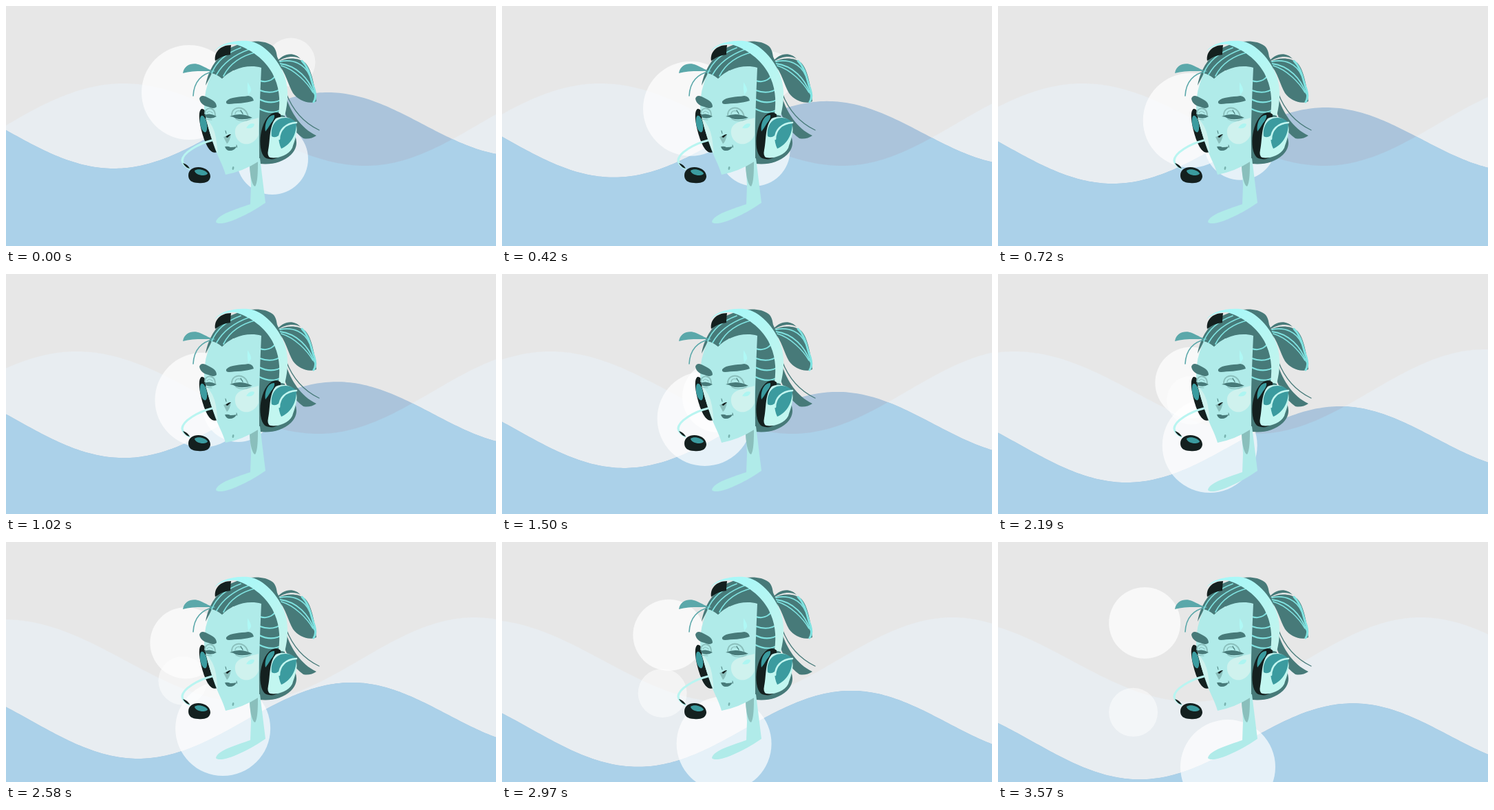
Write an HTML page with a canvas that moves like this. It is 712 px wide and 350 px high and loops after 3.6 s.

```html
<!DOCTYPE html>
<html lang="en">
<head>
<meta charset="utf-8">
<title>Headset</title>
<style>
html, body { margin: 0; width: 100%; height: 100%; overflow: hidden; background: #e7e7e7; }
canvas { display: block; }
</style>
</head>
<body>
<canvas id="stage" width="712" height="350"></canvas>
<script>
const W = 712, H = 350, LOOP = 3600, STEP = 30;
const ctx = document.getElementById('stage').getContext('2d');

const SKIN = '#b0ebe9', SHADE = '#8abfbc', HAIR = '#477a79', STRAND = '#80e3e1';
const BLACK = '#14201f', TEAL = '#3b9b9f', BOOM = '#b9f5f1', CUP = '#c2f6f0', GLOW = '#cff2ee';

const BAND = ctx.createLinearGradient(335, 52, 405, 150);
BAND.addColorStop(0, '#a8f8f8');
BAND.addColorStop(1, '#c4f4ed');

// Turning points of each wave at t = 0; speeds are px per ms.
const paleWave = { points: [[-215, 262], [171, 113], [523, 233], [854, 110], [1184, 232]], vx: -0.0672, vy: 0 };
const blueWave = { points: [[-155, 126], [157, 237], [467, 126], [745, 219]], vx: 0.0137, vy: 0.0306 };

const circles = [
  { x: 414, y: 82, r: 35.5, vx: -0.0609, vy: 0.0466, alpha: 0.5 },
  { x: 387, y: 223, r: 52, vx: -0.0487, vy: -0.0294, alpha: 0.7 },
  { x: 266, y: 126, r: 69, vx: 0.01905, vy: 0.0566, alpha: 0.7 }
];

function waveHeight(points, x) {
  let i = 0;
  while (i < points.length - 2 && x > points[i + 1][0]) i++;
  const [x0, y0] = points[i], [x1, y1] = points[i + 1];
  return y0 + (y1 - y0) * (1 - Math.cos(Math.PI * (x - x0) / (x1 - x0))) / 2;
}

function wavePath({ points, vx, vy }, t) {
  const path = new Path2D();
  path.moveTo(-4, H + 4);
  for (let x = -4; x <= W + 4; x += 4) {
    path.lineTo(x, waveHeight(points, x - vx * t) + vy * t);
  }
  path.lineTo(W + 4, H + 4);
  path.closePath();
  return path;
}

function drawBackground(t) {
  ctx.fillStyle = '#e7e7e7';
  ctx.fillRect(0, 0, W, H);
  const pale = wavePath(paleWave, t), blue = wavePath(blueWave, t);
  ctx.fillStyle = '#e8edf1';
  ctx.fill(pale);
  ctx.fillStyle = '#abc4db';
  ctx.fill(blue);
  ctx.save();
  ctx.clip(pale);
  ctx.fillStyle = '#abd1e9';
  ctx.fill(blue);
  ctx.restore();
  for (const c of circles) {
    ctx.fillStyle = `rgba(255,255,255,${c.alpha})`;
    ctx.beginPath();
    ctx.arc(c.x + c.vx * t, c.y + c.vy * t, c.r, 0, 2 * Math.PI);
    ctx.fill();
  }
}

const shape = (color, d) => ({ color, path: new Path2D(d) });
const line = (color, width, d) => ({ color, width, path: new Path2D(d) });
function oval(color, x, y, rx, ry, degrees = 0) {
  const path = new Path2D();
  path.ellipse(x, y, rx, ry, degrees * Math.PI / 180, 0, 2 * Math.PI);
  return { color, path };
}

const ponytail = [
  shape(HAIR, 'M394 82C406 75 424 74 435 83C444 92 449 118 451 139C440 144 425 138 417 127C410 115 407 98 394 82Z'),
  shape(HAIR, 'M393 82C402 69 418 66 428 77C419 72 407 73 393 82Z'),
  line(STRAND, 1.8, 'M398 81C418 77 434 85 441 101'),
  line(STRAND, 2, 'M398 84C423 87 440 106 448 128'),
  line(STRAND, 1.6, 'M400 87C420 93 438 112 446 126'),
  line(STRAND, 3, 'M430 80C442 92 443 109 448 121C450 128 451 134 447 140'),
  shape(HAIR, 'M407 133C414 155 428 178 451 189Q442 195 432 193C419 184 409 168 404 152Z'),
  line(HAIR, 1.3, 'M407 127C415 148 430 169 455 181')
];

const hair = [
  shape(HAIR, 'M290 116C294 92 308 71 328 60C348 50 374 48 387 58C392 62 393 68 394 74C403 92 408 126 403 157L421 192Q425 206 414 217C402 228 386 232 368 230L366 95L330 94L314 107L299 99Z'),
  shape('#5ba8aa', 'M257 98C259 85 272 82 282 86C291 90 297 94 303 95C286 95 270 94 257 98Z'),
  line('#5ba8aa', 1.6, 'M272 131C273 112 282 99 303 95'),
  line(STRAND, 1.7, 'M299 98C305 83 319 69 341 61'),
  line(STRAND, 1.7, 'M306 100C315 84 329 72 354 63'),
  line(STRAND, 1.7, 'M316 102C324 86 339 73 365 67'),
  line(STRAND, 2, 'M369 109C382 113 391 106 396 94'),
  line(STRAND, 2, 'M369 123C382 128 393 126 402 119'),
  line(STRAND, 2, 'M368 136C382 143 394 141 404 134'),
  line(STRAND, 2, 'M368 150C380 156 390 157 400 151')
];

const head = [
  shape(BLACK, 'M284 150C290 149 292 158 295 170L307 213C300 216 294 210 289 197C283 181 277 155 284 150Z'),
  oval(TEAL, 287, 172, 4.8, 12.5, -11),
  shape(SKIN, 'M354 224L356 262L355 289C335 296 307 304 305 315C308 320 326 315 336 310Q357 301 377 287L369 222Z'),
  shape(SHADE, 'M354 231C354 247 358 263 362 263C366 257 366 239 366 224Z'),
  shape(SKIN, 'M299 98Q307 100 314 106C326 93 350 84 371 90C369 136 367 181 368 226Q345 241 319 246C315 231 307 219 302 203Q293 178 288 150Q287 124 299 98Z'),
  shape(GLOW, 'M290 163Q302 174 305 192L308 215Q300 201 290 163Z'),
  shape(GLOW, 'M333 181C335 169 349 168 367 163L367 188C363 199 350 205 341 199C335 195 332 188 333 181Z'),
  shape('#adf5f1', 'M349 178Q354 169 361 172Q360 180 349 178Z'),
  shape('#aff8f5', 'M351 111Q357 120 356 124L352 130Q350 120 351 111Z')
];

const features = [
  shape(HAIR, 'M320 139C326 132 340 133 352 131Q359 132 360 138C350 142 333 142 324 143Q319 143 320 139Z'),
  shape(HAIR, 'M281 135Q283 129 290 132C298 136 306 139 306 147Q302 151 294 147C286 145 282 141 281 135Z'),
  line(SHADE, 1.9, 'M328 159C328 151 335 147 342 149C348 151 351 156 352 162'),
  line(SHADE, 1.4, 'M333 157C334 152 341 151 344 157'),
  line(HAIR, 1.1, 'M341 152L344 157'),
  shape(HAIR, 'M325 161Q341 154 358 163Q344 167 334 164Q330 161 325 161Z'),
  line(SHADE, 1.2, 'M334 165Q344 170 355 165'),
  line(SHADE, 1.9, 'M289 157C289 151 294 148 299 150Q304 152 304 160'),
  line(SHADE, 1.2, 'M292 156Q295 151 300 156'),
  shape(HAIR, 'M288 159Q297 155 306 161Q300 165 292 163Z'),
  line(SHADE, 1.1, 'M290 165L299 166'),
  line(HAIR, 1, 'M319 182L320 186'),
  shape(SHADE, 'M316 191L327 187Q325 198 321 201Z'),
  shape(BLACK, 'M319 191Q323 187 327 187L322 192Z'),
  shape(HAIR, 'M318 205Q323 204 326 206Q331 206 335 205Q332 211 325 211Q320 211 318 205Z'),
  line(HAIR, 1, 'M335 203L335.5 206'),
  oval('#78b3b0', 330, 236.5, 1.4, 2.6, 10)
];

const headset = [
  shape(BLACK, 'M304 80C302 68 311 57 327 57Q326 66 326 71Q314 72 304 80Z'),
  shape(BAND, 'M303 66C314 52 337 50 352 51C374 53 397 79 405 103C411 121 410 140 405 160L396 158C399 136 397 117 387 98C376 78 356 63 334 56Q316 54 303 66Z'),
  shape(BLACK, 'M386 157Q394 153 399 158L397 219Q389 226 378 222C365 216 366 170 386 157Z'),
  shape(TEAL, 'M377 183C375 170 382 158 390 159Q391 164 385 171Q381 178 377 183Z'),
  shape(CUP, 'M392 164C402 159 416 163 420 170C426 179 420 195 416 207C410 219 392 223 384 221Q379 219 381 210C384 197 382 175 392 164Z'),
  shape(TEAL, 'M386 190C384 174 393 163 406 163Q417 163 422 171C422 190 412 203 400 208Q396 200 396 189Q391 193 386 190Z'),
  line(CUP, 2.6, 'M397 194C397 181 406 171 422 170'),
  line(BOOM, 3.2, 'M299 196C279 201 257 214 256 225Q256 231 266 237'),
  shape(BLACK, 'M257 229Q264 231 267 237Q261 236 257 229Z'),
  shape(BLACK, 'M265 247C265 237 276 233 286 236C293 238 297 243 297 249C296 257 288 259 279 258C270 258 265 254 265 247Z'),
  shape(TEAL, 'M274 240C279 236 290 239 293 244C292 249 275 248 274 240Z')
];

const character = [...ponytail, ...hair, ...head, ...features, ...headset];

function drawCharacter() {
  ctx.lineCap = 'round';
  for (const { color, width, path } of character) {
    if (width) {
      ctx.strokeStyle = color;
      ctx.lineWidth = width;
      ctx.stroke(path);
    } else {
      ctx.fillStyle = color;
      ctx.fill(path);
    }
  }
}

function render(now) {
  const t = Math.floor((now % LOOP) / STEP) * STEP;
  drawBackground(t);
  drawCharacter();
}

const start = performance.now();
function tick() {
  render(performance.now() - start);
  requestAnimationFrame(tick);
}
tick();
</script>
</body>
</html>
```
